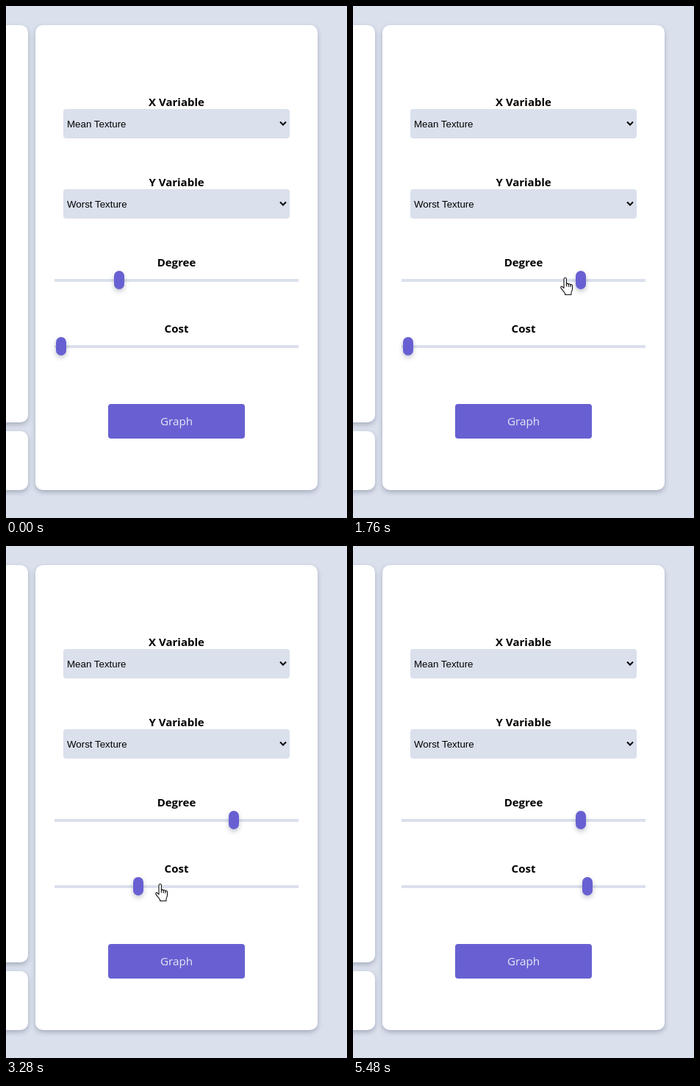
Write an HTML page that moves like this. It is 464 px wide and 696 px high and loops after 5840 ms.

```html
<!DOCTYPE html>
<html lang="en">
<head>
<meta charset="utf-8">
<title>Graph controls</title>
<style>
  html, body { margin: 0; width: 100%; height: 100%; overflow: hidden; background: #dae0ec; }
  body { position: relative; }
  .card, .select, .track, .thumb, .button, .label { position: absolute; box-sizing: border-box; }
  .card { background: #fff; border-radius: 10px; box-shadow: 0 3px 6px rgba(50, 55, 85, .3); }
  .label { left: 40px; width: 384px; height: 22px; text-align: center;
    font: 700 15px/22px "Open Sans", "Noto Sans", sans-serif; color: #000; }
  .select { left: 78px; width: 308px; height: 40px; padding-left: 5px; border-radius: 4px;
    background: #dae0ec; font: 13.333px/42px "Liberation Sans", Arial, sans-serif; color: #000; }
  .select svg { position: absolute; left: 293px; top: 15px; }
  .select path { fill: none; stroke: #000; stroke-width: 2; }
  .track { left: 66px; width: 332px; height: 4px; background: #dae0ec; }
  .thumb { left: -7px; width: 14px; height: 25px; border-radius: 7px; background: #6860d2;
    box-shadow: 0 3px 6px rgba(50, 55, 85, .3); }
  .button { left: 139px; top: 541px; width: 186px; height: 47px; border-radius: 4px;
    background: #6860d2; color: #e4e9f5; text-align: center;
    font: 15.2px/47px "Open Sans", "Noto Sans", sans-serif; }
  #pointer { position: absolute; left: 0; top: 0; overflow: visible; }
  #pointer path { fill: #fff; stroke: #111; stroke-width: 1.1; stroke-linejoin: round; stroke-linecap: round; }
</style>
</head>
<body>
<div class="card" style="left:-60px;top:26px;width:90px;height:540px"></div>
<div class="card" style="left:-60px;top:578px;width:90px;height:80px"></div>
<div class="card" style="left:40px;top:26px;width:384px;height:632px"></div>

<div class="label" style="top:119px">X Variable</div>
<div class="select" style="top:140px">Mean Texture
  <svg width="12" height="10"><path d="M2 2.5 6 6.5 10 2.5"/></svg></div>
<div class="label" style="top:228px">Y Variable</div>
<div class="select" style="top:249px">Worst Texture
  <svg width="12" height="10"><path d="M2 2.5 6 6.5 10 2.5"/></svg></div>

<div class="label" style="top:337px">Degree</div>
<div class="track" style="top:371px"></div>
<div class="thumb" id="degree" style="top:360px"></div>
<div class="label" style="top:427px">Cost</div>
<div class="track" style="top:461px"></div>
<div class="thumb" id="cost" style="top:450px"></div>

<div class="button">Graph</div>

<svg id="pointer" width="20" height="26">
  <path id="arrow" d="M.5 .6V16.4L4.2 13 6.6 18.6 9 17.6 6.6 12.1H11.6Z"/>
  <g id="hand" transform="translate(-6 0)">
    <path d="M5 14.5V2.2a1.7 1.7 0 0 1 3.4 0V9c.4-1.3 2.5-1.1 2.8.4.5-1 2.3-.8 2.7.6.6-.8 2.6-.4 2.6 1.4V16c0 2-1.4 3-1.6 5v2.5H6.6V22C5.5 19.5 2 17 .8 14 .3 12.3 2 11.6 3.2 12.8Z"/>
    <path d="M8.4 9v3M11.2 9.4V12.4M13.9 10V12.8" style="fill:none"/>
  </g>
</svg>

<script>
const LOOP = 5840, STEP = 40, ENTER = 200, LEAVE = 4800;
const el = id => document.getElementById(id);
const pointer = el("pointer"), arrow = el("arrow"), hand = el("hand");

const out = u => 1 - (1 - u) ** 2;
const smooth = u => u * u * (3 - 2 * u);

// Pointer moves: start, end, x and y reached, easing
const entry = [12, 434];
const moves = [
  [200, 800, 132, 388, out],
  [840, 1160, 156, 371, smooth],
  [1310, 1960, 302, 369, out],      // drag Degree
  [1960, 2315, 36, 451, out],
  [2320, 2520, 44, 458, smooth],
  [2520, 2700, 80, 462, out],
  [2880, 3460, 247, 458, smooth],   // drag Cost
  [3520, 3980, 317, 459, smooth],
  [4140, 4280, 307, 457, smooth],
  [4560, 4900, 450, 420, smooth]
];

function at(t) {
  let [x, y] = entry;
  for (const [start, end, toX, toY, ease] of moves) {
    if (t <= start) break;
    const k = ease(Math.min(1, (t - start) / (end - start)));
    x += (toX - x) * k;
    y += (toY - y) * k;
  }
  return [Math.round(x), Math.round(y)];
}

// A dragged thumb jumps to the stop nearest to the pointer, less the grip offset
function drag(id, t, from, to, first, gap, grip) {
  const x = at(Math.min(to, Math.max(from, t)))[0] - grip;
  const stop = first + gap * Math.round((x - first) / gap);
  el(id).style.transform = `translateX(${Math.round(stop)}px)`;
}

function draw(now) {
  const t = Math.floor(now % LOOP / STEP) * STEP;
  drag("degree", t, 1240, 1960, 75.4, 78.3, 2);
  drag("cost", t, 2880, 4000, 75.2, 34.83, 13);

  const [x, y] = at(t);
  const over = x >= 66 && x <= 398 && [360, 450].some(top => y >= top && y <= top + 25);
  pointer.style.display = t >= ENTER && t < LEAVE ? "block" : "none";
  pointer.style.transform = `translate(${x}px, ${y}px)`;
  arrow.style.display = over ? "none" : "inline";
  hand.style.display = over ? "inline" : "none";
}

const start = performance.now();
function tick() {
  draw(performance.now() - start);
  requestAnimationFrame(tick);
}
tick();
</script>
</body>
</html>
```
